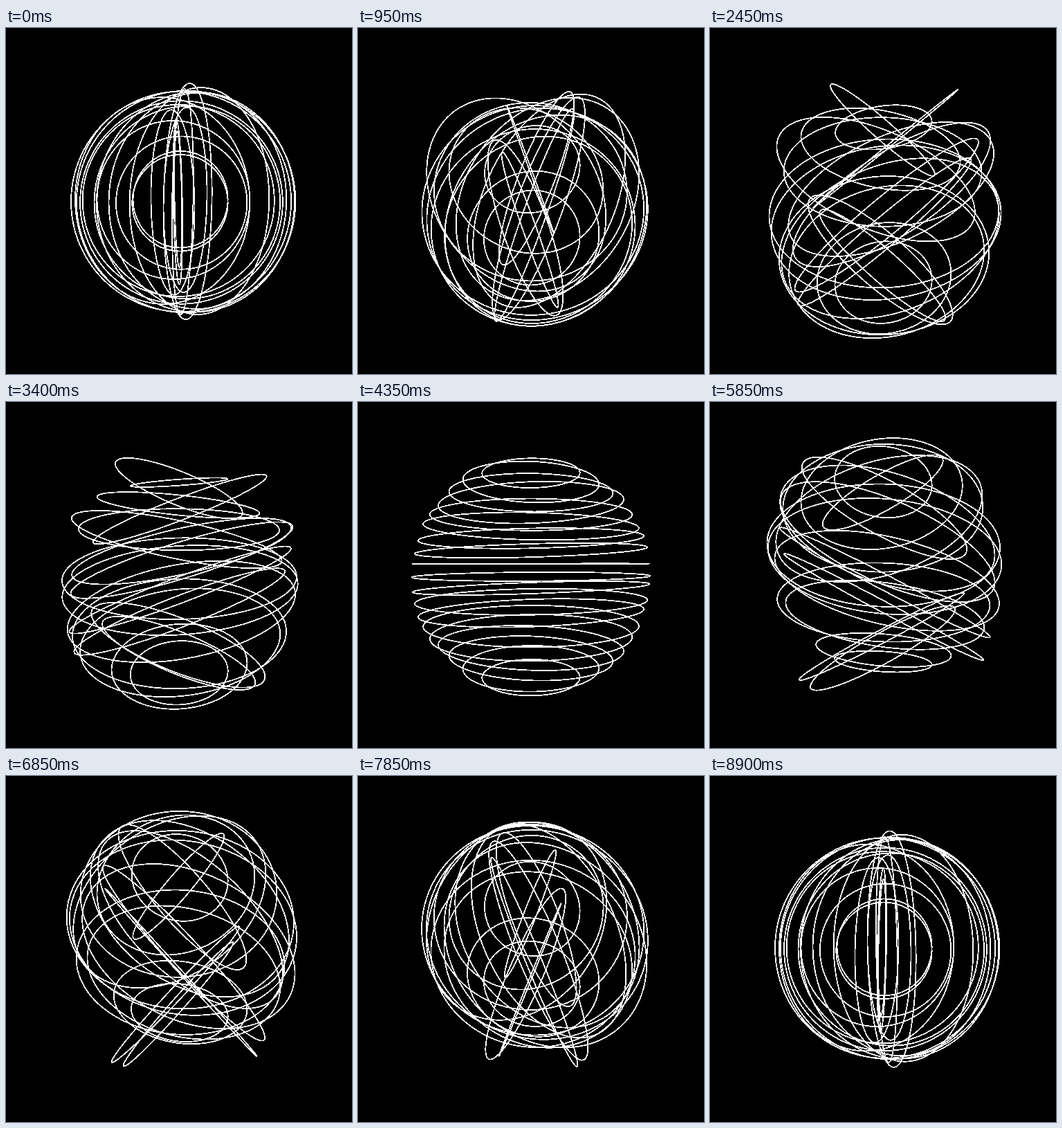
Animation, 500 px wide and 500 px high, one loop 8.95 s. Source, as an HTML page:

```html
<!DOCTYPE html>
<html lang="en">
<head>
<meta charset="utf-8">
<title>Turning rings</title>
<style>
  html, body { margin: 0; width: 100%; height: 100%; overflow: hidden; background: #000; }
  svg { display: block; width: 500px; height: 500px; }
  path {
    fill: none;
    stroke: #fff;
    stroke-width: 1.8;
    stroke-linejoin: round;
    shape-rendering: crispEdges;
  }
</style>
</head>
<body>
<svg viewBox="0 0 500 500"></svg>
<script>
const svg = document.querySelector('svg');
const RAD = Math.PI / 180;
const RADIUS = 160;
const EYE = 250 / Math.tan(30 * RAD);
const STEP = 50;
const STEPS = 179;
const POINTS = 160;

// Heading of each ring about the vertical axis, top to bottom, in degrees
const headings = [-11, 87, 16, -77, 1, 34, -36.5, -54, -3, -10,
                  -79, -27.5, -85, -4, -16, 77, 87, -10, -7.5];

const rings = headings.map((deg, i) => {
  const height = (i - 9) * RADIUS / 10;
  const path = document.createElementNS('http://www.w3.org/2000/svg', 'path');
  svg.append(path);
  return {
    path,
    height,
    r: Math.sqrt(RADIUS * RADIUS - height * height),
    sin: Math.sin(deg * RAD),
    cos: Math.cos(deg * RAD)
  };
});

function outline(ring, sinT, cosT) {
  const points = [];
  for (let i = 0; i < POINTS; i++) {
    const phi = i / POINTS * 2 * Math.PI;
    const u = ring.r * Math.cos(phi);
    const v = ring.r * Math.sin(phi);
    const x = u * sinT * ring.sin + v * ring.cos;
    const y = ring.height * sinT + u * cosT;
    const z = u * sinT * ring.cos - v * ring.sin;
    const scale = EYE / (EYE - z);
    points.push((250 + x * scale).toFixed(2) + ' ' + (250 + y * scale).toFixed(2));
  }
  return 'M' + points.join('L') + 'Z';
}

let shown = -1;
function draw(now) {
  const step = Math.floor(now / STEP) % STEPS;
  if (step === shown) return;
  shown = step;
  const turn = (step + 1) * RAD;
  const sinT = Math.sin(turn);
  const cosT = Math.cos(turn);
  for (const ring of rings) ring.path.setAttribute('d', outline(ring, sinT, cosT));
}

let start;
function tick(now) {
  start ??= now;
  draw(now - start);
  requestAnimationFrame(tick);
}
draw(0);
requestAnimationFrame(tick);
</script>
</body>
</html>
```
